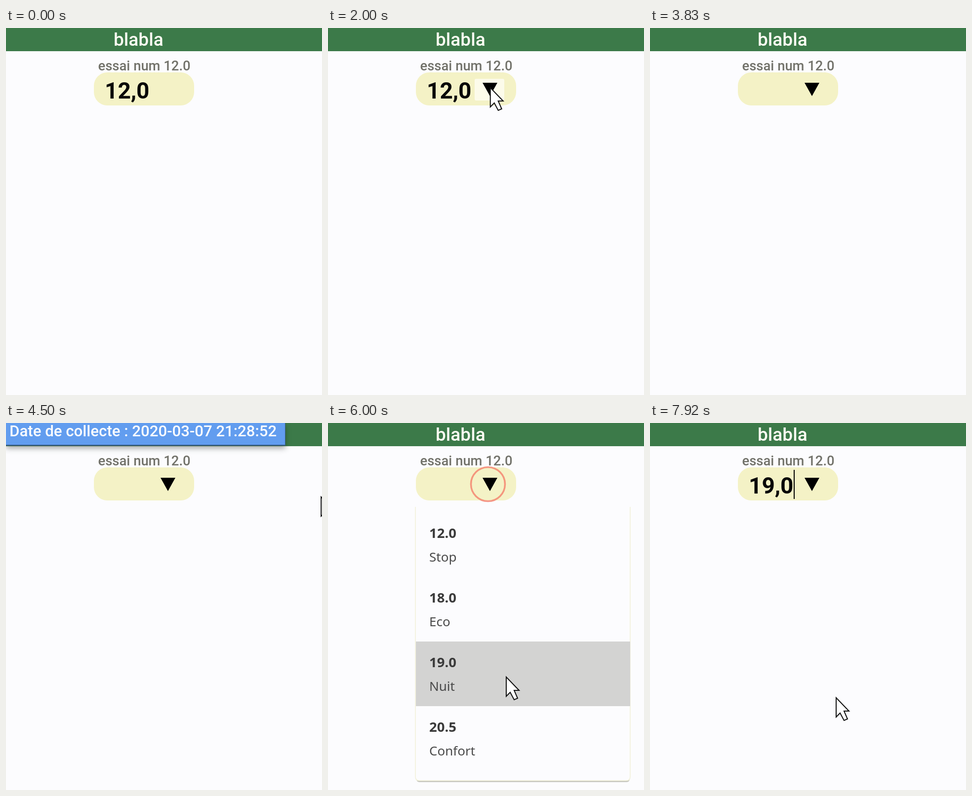
These frames come from a looping animation (640x744 px, 8000 ms). An HTML page:

```html
<!DOCTYPE html>
<html lang="fr">
<head>
<meta charset="utf-8">
<style>
  html, body { margin: 0; width: 100%; height: 100%; overflow: hidden; background: #fcfcfe; }
  svg { display: block; width: 100%; height: 100%; }
  text { font-family: Roboto, sans-serif; font-weight: 500; white-space: pre; }
  #value { font-size: 46px; font-weight: 700; }
  #tooltip { filter: drop-shadow(0 5px 6px rgba(20, 30, 20, .4)); }
  #menu text { font-family: "Noto Sans", "Open Sans", sans-serif; font-size: 26px; font-weight: 400; fill: #4a4a4a; }
  #menu text.number { font-size: 27.5px; font-weight: 600; fill: #3a3a3a; }
</style>
</head>
<body>
<svg viewBox="0 0 640 744">
  <rect width="640" height="744" fill="#fcfcfe"/>
  <rect width="640" height="47" fill="#3c7a49"/>
  <text x="218" y="36" font-size="37" fill="#fafbf2">blabla</text>

  <g id="tooltip">
    <rect width="566" height="46" fill="#3a5f92"/>
    <rect width="565" height="44" fill="#629def"/>
    <text x="7" y="27" font-size="31.2" fill="#fbfcfe">Date de collecte : 2020-03-07 21:28:52</text>
  </g>

  <text x="186.5" y="86" font-size="27.4" fill="#72726a">essai num 12.0</text>
  <rect x="178" y="90" width="203" height="67" rx="27" fill="#f4f2c6"/>
  <rect id="selection" x="200" y="95" width="91" height="58" fill="#448af2"/>
  <text id="value" x="200" y="143"></text>
  <rect id="caret" x="291" y="95" width="2" height="59"/>
  <rect id="hover" x="297" y="103" width="60" height="44" rx="3" fill="#fcfbea"/>
  <path id="arrow" d="M313 111h30l-15 27z"/>

  <g id="menu">
    <rect x="179" y="715" width="432" height="13" rx="6" fill="#c6c6c0"/>
    <path d="M177 170V717q0 8 8 8H604q8 0 8-8V170" fill="#fcfcfe" stroke="#f1f0d8" stroke-width="1.5"/>
    <rect id="option" x="178" width="434" height="131" fill="#d3d3d2"/>
  </g>

  <circle id="ring" fill="none" stroke="#f4806c" stroke-width="3.5"/>
  <path id="cursor" d="M0 0V39L8 31L16 46L23 43L16 27H26Z" fill="#fff" stroke="#111" stroke-width="2"/>
</svg>
<script>
const LOOP = 8000;
const OPTION_TOP = 181, OPTION_HEIGHT = 131;
const RING_RADIUS = 34.5, RING_LIFE = 450;
const BLINK = 530;

const $ = id => document.getElementById(id);
const show = (id, on) => $(id).setAttribute('visibility', on ? 'visible' : 'hidden');
const clamp = v => Math.min(1, Math.max(0, v));
const progress = (t, from, to) => clamp((t - from) / (to - from));
const easeOut = p => 1 - (1 - p) ** 2;
const mix = (a, b, p) => a + (b - a) * p;
const within = (t, from, to) => t >= from && t < to;
const point = (x, y) => ({ x, y });

const entry = point(375, 203), button = point(329, 121), field = point(298, 122);
const away = point(597, 108), edge = point(640, 150), near = point(349, 142);
const press = point(324, 124), browse = point(361, 515), pick = point(361, 571), rest = point(377, 557);

const time = { reveal: 700, select: 2800, erase: 3750, open: 5632, choose: 6745 };

// The pointer stays at the end of a move until the next one, or until it hides.
const move = (start, end, from, to, hide = LOOP) => ({ start, end, from, to, hide });
const moves = [
  move(330, 1420, entry, button),
  move(2000, 2250, button, field, 2250),
  move(3170, 3750, field, away, 3830),
  move(4500, 4830, edge, near),
  move(5250, 5500, near, press),
  move(time.open, 6000, press, browse),
  move(6080, 6330, browse, pick),
  move(7330, 7670, pick, rest)
];

const clicks = [
  { start: time.select - 20, at: point(270, 122) },
  { start: time.open, at: press },
  { start: time.choose, at: pick }
];

const options = [['12.0', 'Stop'], ['18.0', 'Eco'], ['19.0', 'Nuit'], ['20.5', 'Confort']];

function addText(content, y, className) {
  const el = document.createElementNS('http://www.w3.org/2000/svg', 'text');
  el.setAttribute('x', 205);
  el.setAttribute('y', y);
  el.setAttribute('class', className);
  el.textContent = content;
  $('menu').append(el);
}

options.forEach(([number, name], i) => {
  const top = OPTION_TOP + i * OPTION_HEIGHT;
  addText(number, top + 52, 'number');
  addText(name, top + 100, 'name');
});

function pointerAt(t) {
  const current = moves.findLast(m => t >= m.start);
  if (!current || t >= current.hide) return null;
  const { start, end, from, to } = current;
  const p = easeOut(progress(t, start, end));
  return point(mix(from.x, to.x, p), mix(from.y, to.y, p));
}

function drawRing(t) {
  const click = clicks.find(c => within(t, c.start, c.start + RING_LIFE));
  show('ring', click);
  if (!click) return;
  const growth = progress(t, click.start, click.start + 365);
  const ring = $('ring');
  ring.setAttribute('cx', click.at.x);
  ring.setAttribute('cy', click.at.y);
  ring.setAttribute('r', RING_RADIUS * growth);
  ring.setAttribute('opacity', 0.4 + 0.4 * growth ** 4);
}

function drawMenu(t, pointer) {
  const open = within(t, time.open + 30, time.choose + 45);
  $('menu').style.display = open ? '' : 'none';
  if (!open) return;
  const index = Math.floor((pointer.y - OPTION_TOP) / OPTION_HEIGHT);
  show('option', index in options);
  $('option').setAttribute('y', OPTION_TOP + index * OPTION_HEIGHT);
}

function render(t) {
  const pointer = pointerAt(t);
  const selected = within(t, time.select, time.erase);
  show('cursor', pointer);
  if (pointer) $('cursor').setAttribute('transform', `translate(${pointer.x} ${pointer.y})`);

  show('arrow', t >= time.reveal);
  show('hover', pointer && within(pointer.x, 297, 357) && within(pointer.y, 103, 147));
  show('selection', selected);
  show('caret', t >= time.choose && Math.floor((t - time.choose + 400) / BLINK) % 2 === 0 || within(t, time.choose, time.choose + BLINK));
  $('value').textContent = t < time.erase ? '12,0' : t < time.choose ? '' : '19,0';
  $('value').setAttribute('fill', selected ? '#fff' : '#080808');

  $('tooltip').setAttribute('opacity', progress(t, 3850, 4100) * (1 - progress(t, 5400, 5560)));
  drawMenu(t, pointer);
  drawRing(t);
}

const begin = performance.now();
function tick() {
  render((performance.now() - begin) % LOOP);
  requestAnimationFrame(tick);
}
tick();
</script>
</body>
</html>
```
